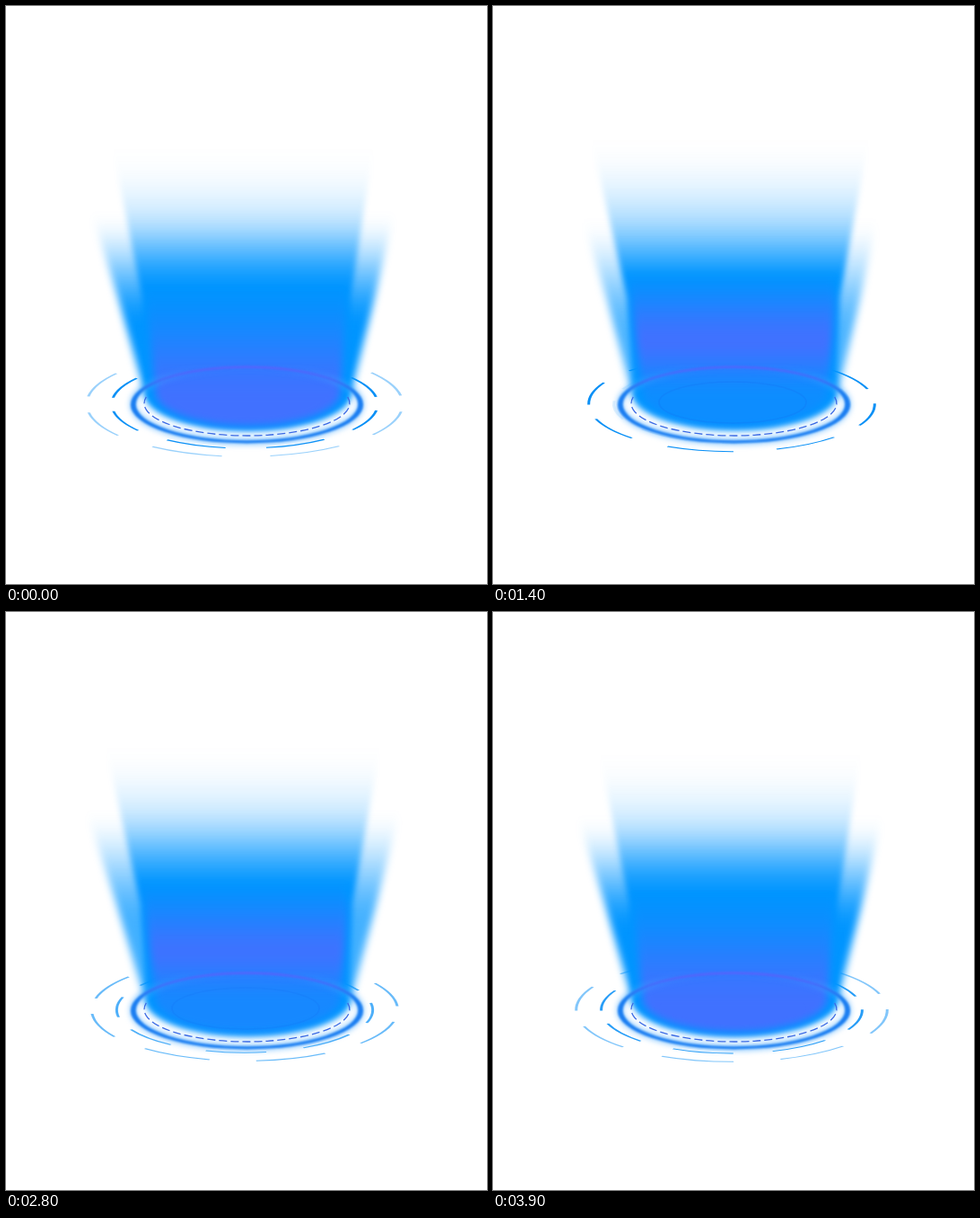
These frames come from a looping animation (536x643 px, 4 s). An HTML page with a canvas:

```html
<!DOCTYPE html>
<html lang="en">
<head>
<meta charset="utf-8">
<title>Light beam</title>
<style>
  html, body { margin: 0; width: 100%; height: 100%; overflow: hidden; background: #fff; }
  canvas { display: block; width: 536px; height: 643px; }
</style>
</head>
<body>
<canvas id="stage" width="536" height="643"></canvas>
<script>
const ctx = document.getElementById('stage').getContext('2d');
const LOOP = 4000, STEP = 100, WAVE_LIFE = 2;
const TAU = Math.PI * 2, DEG = Math.PI / 180;
const BLUE = '0,149,255', PURPLE = '74,108,255';
const CX = 268.5, TOP_CX = 264, FOOT_CX = 269.5;
const WAIST_Y = 325, FOOT_Y = 430, END_Y = 475;

const mix = (a, b, k) => a + (b - a) * k;
const ramp = (a, b, x) => Math.min(1, Math.max(0, (x - a) / (b - a)));
const smooth = (a, b, x) => {
  const u = ramp(a, b, x);
  return u * u * (3 - 2 * u);
};

// vertical gradient whose opacity follows a function of y
function fade(rgb, top, alpha) {
  const g = ctx.createLinearGradient(0, top, 0, END_Y);
  for (let u = 0; u <= 1; u += 1 / 32) {
    g.addColorStop(u, `rgba(${rgb},${alpha(mix(top, END_Y, u)).toFixed(3)})`);
  }
  return g;
}

// two-part flank standing on the lower half of an ellipse
function beam(fill, blur, top, topHalf, waistHalf, footHalf, depth) {
  const waistX = mix(TOP_CX, FOOT_CX, 0.7);
  ctx.filter = `blur(${blur}px)`;
  ctx.fillStyle = fill;
  ctx.beginPath();
  ctx.moveTo(TOP_CX + topHalf, top);
  ctx.lineTo(waistX + waistHalf, WAIST_Y);
  ctx.ellipse(FOOT_CX, FOOT_Y, footHalf, depth, 0, 0, Math.PI);
  ctx.lineTo(waistX - waistHalf, WAIST_Y);
  ctx.lineTo(TOP_CX - topHalf, top);
  ctx.fill();
  ctx.filter = 'none';
}

function ellipse(cx, cy, rx, ry, from = 0, to = TAU) {
  ctx.beginPath();
  ctx.ellipse(cx, cy, rx, ry, 0, from, to);
  ctx.stroke();
}

// a dashed wave starts every second
function waves(t) {
  for (let i = 0; i < 4; i++) {
    const age = ((t - 330 - i * 1000 + 2 * LOOP) % LOOP) / 1000;
    if (age >= WAVE_LIFE) continue;
    const turn = (i === 1 ? 0 : 22) + t * 0.09;
    ctx.save();
    ctx.translate(266, 442.8);
    ctx.scale(1, 0.332);
    ctx.globalAlpha = Math.min(1, age / 0.65, WAVE_LIFE + 0.08 - age);
    ctx.strokeStyle = '#0a90f6';
    ctx.lineWidth = 3;
    for (let d = 0; d < 8; d++) {
      const mid = turn + d * 45;
      ctx.beginPath();
      ctx.arc(0, 0, 129.5 + 27.9 * age, (mid - 13.7) * DEG, (mid + 13.7) * DEG);
      ctx.stroke();
    }
    ctx.restore();
  }
}

function beams(t) {
  const k = Math.sin(Math.PI * t / LOOP) ** 2;
  const sway = Math.sin(TAU * (t + 20) / LOOP);

  const wideTop = 228 + 9.5 * sway;
  const wideHalf = 169 - 6.3 * sway;
  const wideWaist = mix(wideHalf, 115, ramp(wideTop, FOOT_Y, WAIST_Y));
  const wide = fade(BLUE, wideTop, y => smooth(wideTop, wideTop + 130, y) * (1 - 0.4 * k));
  beam(wide, 4, wideTop, wideHalf, wideWaist, 115, 41);

  const tallTop = 154 - 13 * k;
  const full = 314 - 16 * k;
  const tall = fade(BLUE, tallTop, y => ramp(tallTop, full, y) ** 2.2);
  beam(tall, 3, tallTop, 146 + 12 * k, 116 + 3 * k, 113, 41);

  // violet core leaves the floor as the beam grows
  const core = fade(PURPLE, full, y =>
    0.88 * smooth(full - 10, full + mix(130, 60, k), y) * (1 - k * smooth(370, 435, y)));
  beam(core, 4, full, 112 + 3 * k, 111 + 3 * k, 103, 37);

  ctx.strokeStyle = `rgba(20,110,240,${0.32 * k})`;
  ctx.lineWidth = 1.6;
  ellipse(267, 441, 82, 23);
}

function base() {
  // soft glow
  ctx.filter = 'blur(3px)';
  ctx.strokeStyle = fade('70,170,255', 402, y => 0.6 * ramp(402, 425, y));
  ctx.lineWidth = 7;
  ellipse(CX, 443, 127, 41.5);

  // solid ring, heavier at the sides, violet where it crosses the beam
  const g = ctx.createLinearGradient(0, 400, 0, 428);
  g.addColorStop(0, 'rgba(112,84,250,.7)');
  g.addColorStop(0.4, 'rgba(80,96,250,.7)');
  g.addColorStop(1, '#1c7ef1');
  ctx.filter = 'blur(.8px)';
  ctx.fillStyle = g;
  ctx.beginPath();
  ctx.ellipse(CX, 443.4, 129.6, 43, 0, 0, TAU);
  ctx.ellipse(CX, 443, 123.8, 40.2, 0, 0, TAU);
  ctx.fill('evenodd');
  ctx.filter = 'none';

  ctx.strokeStyle = '#3a6ae4';
  ctx.lineWidth = 1.3;
  ctx.setLineDash([9, 4]);
  ellipse(CX, 442, 114.5, 36, -0.2, Math.PI + 0.2);
  ctx.setLineDash([]);
}

function draw() {
  const t = Math.floor(performance.now() % LOOP / STEP) * STEP;
  ctx.fillStyle = '#fff';
  ctx.fillRect(0, 0, 536, 643);
  waves(t);
  beams(t);
  base();
  requestAnimationFrame(draw);
}
draw();
</script>
</body>
</html>
```
